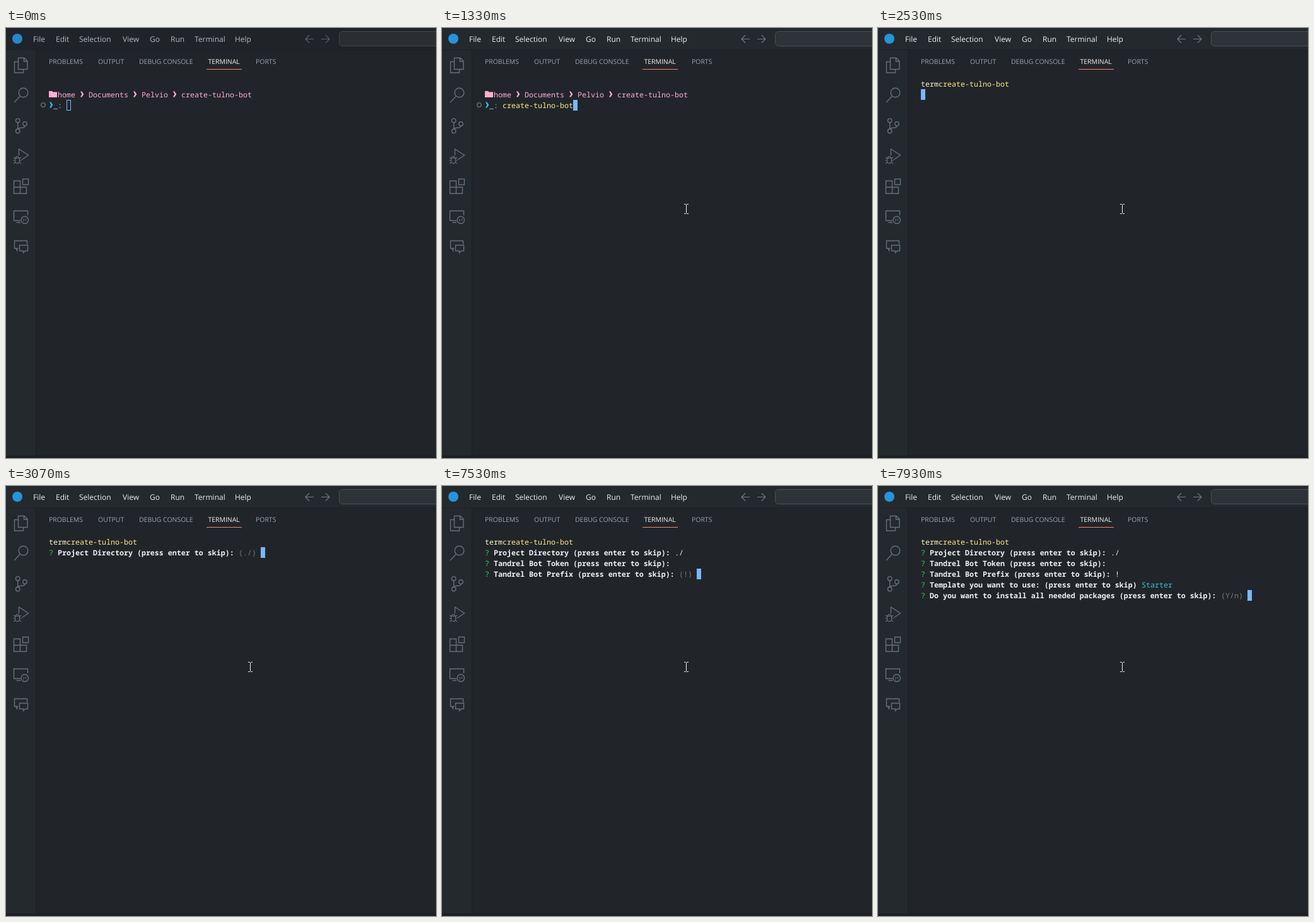
These frames come from a looping animation (682 by 682 pixels, 8 s). An HTML page:

```html
<!DOCTYPE html>
<html lang="en">
<head>
<meta charset="utf-8">
<title>Terminal setup</title>
<style>
  html, body { margin: 0; width: 100%; height: 100%; overflow: hidden; background: #21252a; }
  svg { display: block; width: 100%; height: 100%; }
  text { white-space: pre; text-rendering: geometricPrecision; }
  #bar { fill: #24292e; }
  #menu { font: 500 12px "Open Sans", "Noto Sans", sans-serif; fill: #eceef0; }
  #arrows { fill: none; stroke: #747b82; stroke-width: 1.1; }
  #search { fill: #2f3337; stroke: #4b5056; }
  .idle #bar { fill: #202429; }
  .idle #menu { fill: #b4bac0; }
  .idle #arrows { stroke: #5a6067; }
  .idle #search { fill: #2a2e32; stroke: #43484d; }
  .idle #logo { opacity: .9; }
  #tabs { font: 10.45px "Open Sans", "Noto Sans", sans-serif; fill: #9ba3ab; }
  #tabs .on { fill: #f6f3ea; font-weight: 500; }
  #icons { fill: none; stroke: #666f78; stroke-width: 1.4; }
  #term { font: 500 11.667px "Noto Sans Mono", "DejaVu Sans Mono", monospace; fill: #eceef0; }
  #term .bold { font-weight: 600; fill: #f0f2f4; }
  #term .term { font-weight: 500; fill: #fdf6c8; }
  #term .pink { fill: #ffadd4; }
  #term .blue { fill: #79b8ff; }
  #term .cyan { fill: #39c5cf; }
  #term .sky { fill: #3cbdea; }
  #term .green { fill: #34d058; }
  #term .yellow { fill: #ffea7f; }
  #term .gray { fill: #737a7d; }
</style>
</head>
<body>
<svg id="stage" viewBox="0 0 682 682">
  <rect width="682" height="682" fill="#21252a"/>
  <rect y="35" width="47" height="643" fill="#24292e"/>
  <rect id="bar" width="682" height="34"/>
  <path d="M0 34.5H682M47.5 35V678" stroke="#1c2024"/>
  <rect y="678" width="682" height="4" fill="#1c2024"/>
  <circle id="logo" cx="18" cy="17" r="8" fill="#2594dc"/>
  <g id="menu"></g>
  <path id="arrows" d="M488 17.5H475.5M481 11.5l-6 6 6 6M500 17.5H512.5M507 11.5l6 6-6 6"/>
  <rect id="search" x="528.5" y="5.5" width="170" height="23" rx="5"/>
  <g id="tabs"></g>
  <rect x="318" y="65" width="56" height="1" fill="#f9826c"/>

  <g id="icons">
    <!-- files, search, branches -->
    <path d="M19.5 47.5H29L34 52.5V65.5H19.5ZM28.5 47.5V53H34M19 53.5H13.5V71H27.5V66"/>
    <circle cx="27.5" cy="102.5" r="7.3"/><path d="M22 108.5L13 118"/>
    <circle cx="18.7" cy="146.8" r="3.2"/><circle cx="18.7" cy="163.5" r="3.2"/>
    <circle cx="30" cy="152" r="3.2"/>
    <path d="M18.7 150V160.3M30 155.2C30 159 26 158 22 158.5Q19.5 159 18.7 160.3"/>
    <!-- run and debug -->
    <path d="M20.5 202V192L35.5 201.7 25 209"/>
    <path d="M14.5 206.5h7v4.5a3.5 3.8 0 0 1-7 0ZM15.3 206.5a2.7 2.7 0 0 1 5.4 0M12 205l2.5 2M24 205l-2.5 2M11.5 210h3M21.5 210h3M12 215l3-2M24 215l-3-2" stroke-width="1.2"/>
    <!-- extensions -->
    <path d="M12.5 242.5H22.5V252.5H32.5V262.5H12.5ZM12.5 252.5H22.5V262.5M26.5 239.5H35.5V248.5H26.5Z"/>
    <!-- remote screen -->
    <path d="M23 305.5H12.5V290H34.5V297M16.5 308.5H23"/>
    <circle cx="29.8" cy="304.5" r="5.7"/>
    <path d="M27 303l2 2-2 2M32.5 302l-2 2 2 2" stroke-width="1"/>
    <!-- comments -->
    <path d="M19.5 349.5H17.5V353L15.5 349.5H13.5V337.5H33.5V343M21.5 344.5H34.5V353.5H30.5L27.5 356.5V353.5H21.5Z"/>
  </g>

  <g id="term"></g>
  <path id="pointer" d="M-3.5-7.5H-1L0-6.5 1-7.5H3.5M0-6.5V6.5M-3.5 7.5H-1L0 6.5 1 7.5H3.5" fill="none" stroke="#f0f2f4"/>
</svg>

<script>
const $ = id => document.getElementById(id);
const LOOP = 8000, CELL = 7, ROW = 17, LEFT = 68, TOP = 80;
const APP = "create-tulno-bot", SKIP = "(press enter to skip)";

const labels = (items, y, active) => items.map(([text, x]) =>
  `<text x="${x}" y="${y}" class="${text === active ? "on" : ""}">${text}</text>`).join("");
$("menu").innerHTML = labels([["File", 43], ["Edit", 79], ["Selection", 116], ["View", 185],
  ["Go", 228], ["Run", 261], ["Terminal", 299], ["Help", 363]], 22);
$("tabs").innerHTML = labels([["PROBLEMS", 68], ["OUTPUT", 146], ["DEBUG CONSOLE", 211],
  ["TERMINAL", 320.5], ["PORTS", 396]], 57, "TERMINAL");

// Terminal pieces, placed by row and column
const px = col => LEFT + col * CELL;
const py = row => TOP + row * ROW;
const put = (row, col, text, cls = "") =>
  `<text x="${px(col)}" y="${py(row) + 12.5}" class="${cls}">${text}</text>`;
const chevron = (row, col, cls) =>
  `<path class="${cls}" d="M${px(col) + 1} ${py(row) + 3.5}h2.3l3 4.5-3 4.5h-2.3l2.5-4.5z"/>`;
const cursor = (row, col) =>
  `<rect class="blue" x="${px(col)}" y="${py(row)}" width="${CELL}" height="${ROW}"/>`;
const hollow = (row, col) =>
  `<rect x="${px(col) + .5}" y="${py(row) + .5}" width="6" height="16" fill="none" stroke="#79b8ff"/>`;
const ring = '<circle cx="59" cy="122" r="3.3" fill="none" stroke="#5c6268" stroke-width="1.8"/>';

const ask = (row, question, reply = "", cls = "") =>
  put(row, 0, "?", "green") + put(row, 2, question, "bold") +
  put(row, question.length + 3, reply, cls);
const pending = (row, question, hint) =>
  ask(row, question, hint, "gray") + cursor(row, question.length + hint.length + 4);

const folder = '<path class="pink" d="M68 100h5l1.500 1.500H81V110H68z"/>';
const path = () => {
  let col = 2, out = folder;
  ["home", "Documents", "Pelvio", APP].forEach((part, i) => {
    if (i) out += chevron(1, col - 2, "pink");
    out += put(1, col, part, "pink");
    col += part.length + 3;
  });
  return out;
};
const prompt = ring + path() + chevron(2, 0, "sky") + put(2, 1, "_:", "blue");
const title = put(0, 0, "term", "term") + put(0, 4, APP, "yellow");

const DIR = `Project Directory ${SKIP}:`;
const TOKEN = `Tandrel Bot Token ${SKIP}:`;
const PREFIX = `Tandrel Bot Prefix ${SKIP}:`;
const TEMPLATE = `Template you want to use: ${SKIP}`;
const INSTALL = `Do you want to install all needed packages ${SKIP}:`;
const dirDone = title + ask(1, DIR, "./");
const tokenDone = dirDone + ask(2, TOKEN);
const prefixDone = tokenDone + ask(3, PREFIX, "!");

const scenes = [
  [0, prompt + hollow(2, 4)],
  [733, prompt + cursor(2, 4)],
  [1330, prompt + put(2, 4, APP, "yellow") + cursor(2, 20)],
  [1930, ring],
  [2070, ring + title + cursor(1, 0)],
  [2530, title + cursor(1, 0)],
  [3070, title + pending(1, DIR, "(./)")],
  [7200, dirDone + pending(2, TOKEN, "()")],
  [7530, tokenDone + pending(3, PREFIX, "(!)")],
  [7670, prefixDone + ask(4, TEMPLATE, "(Use arrow keys)", "gray") + chevron(5, 0, "cyan") +
    put(5, 2, "Starter", "cyan") + put(6, 2, "Advanced") + put(7, 2, "Sharding")],
  [7930, prefixDone + ask(4, TEMPLATE, "Starter", "cyan") + pending(5, INSTALL, "(Y/n)")]
];

const start = performance.now();
let shown;
function draw() {
  const t = (performance.now() - start) % LOOP;
  const scene = scenes.findLast(([from]) => t >= from);
  if (scene !== shown) {
    $("term").innerHTML = scene[1];
    $("stage").classList.toggle("idle", scene === scenes[0]);
    shown = scene;
  }
  // The pointer glides in over four discrete steps
  const left = 1 - Math.min(3, Math.floor((t - 600) / 66.6)) / 3;
  $("pointer").style.display = t < 600 ? "none" : "";
  $("pointer").setAttribute("transform",
    `translate(${387.5 + Math.round(14 * left)} ${287 + Math.round(75 * left * left)})`);
  requestAnimationFrame(draw);
}
draw();
</script>
</body>
</html>
```
